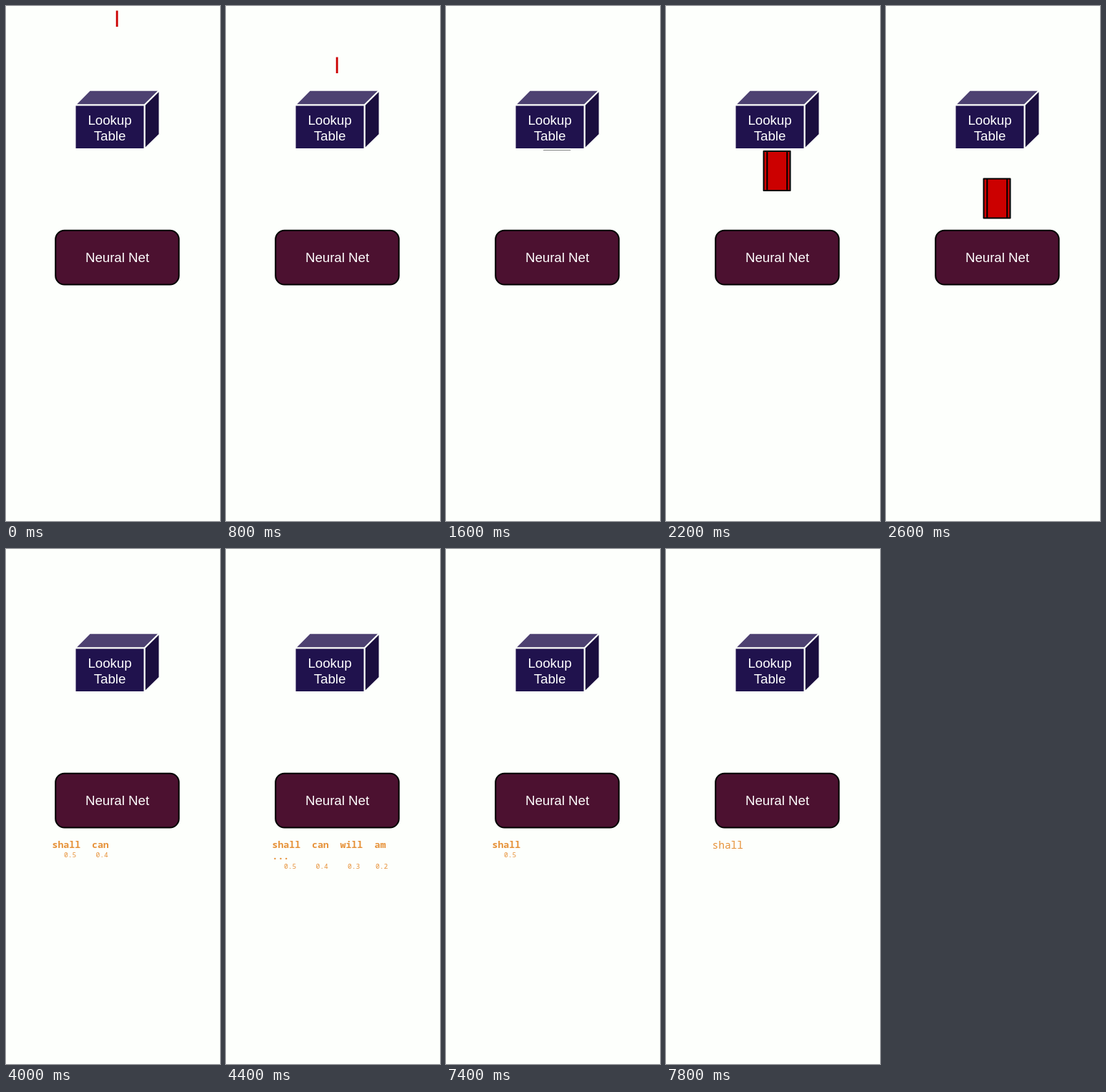
Recreate the animation shown at these times as an HTML page with a canvas. Size 299 by 720 pixels, loop 8000 ms.

```html
<!DOCTYPE html>
<html lang="en">
<head>
<meta charset="utf-8">
<title>Lookup table to neural net</title>
<style>
  html, body { margin: 0; width: 100%; height: 100%; overflow: hidden; background: #fdfffc; }
  canvas { display: block; }
</style>
</head>
<body>
<canvas id="stage" width="299" height="720"></canvas>
<script>
const ctx = document.getElementById('stage').getContext('2d');
const LOOP = 8000, STEP = 200;
const SANS = '18.67px "Liberation Sans", Arial, sans-serif';
const MONO = '"Noto Sans Mono", monospace';
const PAPER = '#fdfffc', ORANGE = '#e69138';
const WORDS = [
  { text: 'shall', x: 64.5, score: '0.5', scoreX: 81 },
  { text: 'can', x: 120, score: '0.4', scoreX: 125.5 },
  { text: 'will', x: 159.5, score: '0.3', scoreX: 170 },
  { text: 'am', x: 207.5, score: '0.2', scoreX: 209 }
];

function label(text, x, y, font, color, align = 'left') {
  ctx.font = font;
  ctx.fillStyle = color;
  ctx.textAlign = align;
  ctx.fillText(text, x, y);
}

function polygon(points, fill) {
  ctx.beginPath();
  points.forEach(([x, y]) => ctx.lineTo(x, y));
  ctx.closePath();
  ctx.fillStyle = fill;
  ctx.fill();
  ctx.strokeStyle = PAPER;
  ctx.lineWidth = 2;
  ctx.lineJoin = 'round';
  ctx.stroke();
}

const mix = (a, b, p) => a + (b - a) * p;

function drawInput(t) {
  ctx.fillStyle = '#cc0000';
  ctx.fillRect(153.7, mix(6.5, 104, t / 1200), 2.8, 22.5);
}

function drawVector(t) {
  const top = t < 2600
    ? mix(145.5, 241.5, (t - 1600) / 1000)
    : mix(241.5, 306.5, (t - 2600) / 800);
  ctx.fillStyle = '#cc0000';
  ctx.strokeStyle = '#000';
  ctx.lineWidth = 2;
  ctx.beginPath();
  ctx.rect(136.5, top, 37, 55);
  ctx.fill();
  for (const x of [141.3, 169.2]) {
    ctx.moveTo(x, top);
    ctx.lineTo(x, top + 55);
  }
  ctx.stroke();
}

function drawTable() {
  polygon([[96.5, 138.5], [117, 117.8], [214.5, 117.8], [193.5, 138.5]], '#4d4171');
  polygon([[193.5, 138.5], [214.5, 117.8], [214.5, 179.5], [193.5, 200]], '#1a0e3e');
  polygon([[96.5, 138.5], [193.5, 138.5], [193.5, 200], [96.5, 200]], '#20124d');
  label('Lookup', 145, 165.5, SANS, '#fff', 'center');
  label('Table', 145, 187.5, SANS, '#fff', 'center');
}

function drawNet() {
  ctx.beginPath();
  ctx.roundRect(69.2, 313.7, 172.4, 75.8, 12.5);
  ctx.fillStyle = '#4c1130';
  ctx.fill();
  ctx.strokeStyle = '#000';
  ctx.lineWidth = 2;
  ctx.stroke();
  label('Neural Net', 155.5, 358.3, SANS, '#fff', 'center');
}

function drawWords(t) {
  if (t >= 7800) {
    label('shall', 64.5, 419, `500 14.5px ${MONO}`, ORANGE);
    return;
  }
  const count = t < 7400 ? Math.min(4, Math.floor((t - 3800) / STEP) + 1) : 1;
  const wrapped = count === 4;
  for (const word of WORDS.slice(0, count)) {
    label(word.text, word.x, 418, `600 13.2px ${MONO}`, ORANGE);
    if (t < 7600) {
      label(word.score, word.scoreX, wrapped ? 446.5 : 430.5, `500 9.6px ${MONO}`, ORANGE);
    }
  }
  if (wrapped) label('...', 64.5, 434, `600 13.2px ${MONO}`, ORANGE);
}

function draw(now) {
  const t = Math.floor((now % LOOP) / STEP) * STEP;
  ctx.fillStyle = PAPER;
  ctx.fillRect(0, 0, 299, 720);
  if (t < 1400) drawInput(t);
  if (t >= 1600 && t < 3600) drawVector(t);
  drawTable();
  drawNet();
  if (t >= 3800) drawWords(t);
}

const start = performance.now();
function tick() {
  draw(performance.now() - start);
  requestAnimationFrame(tick);
}
tick();
</script>
</body>
</html>
```
